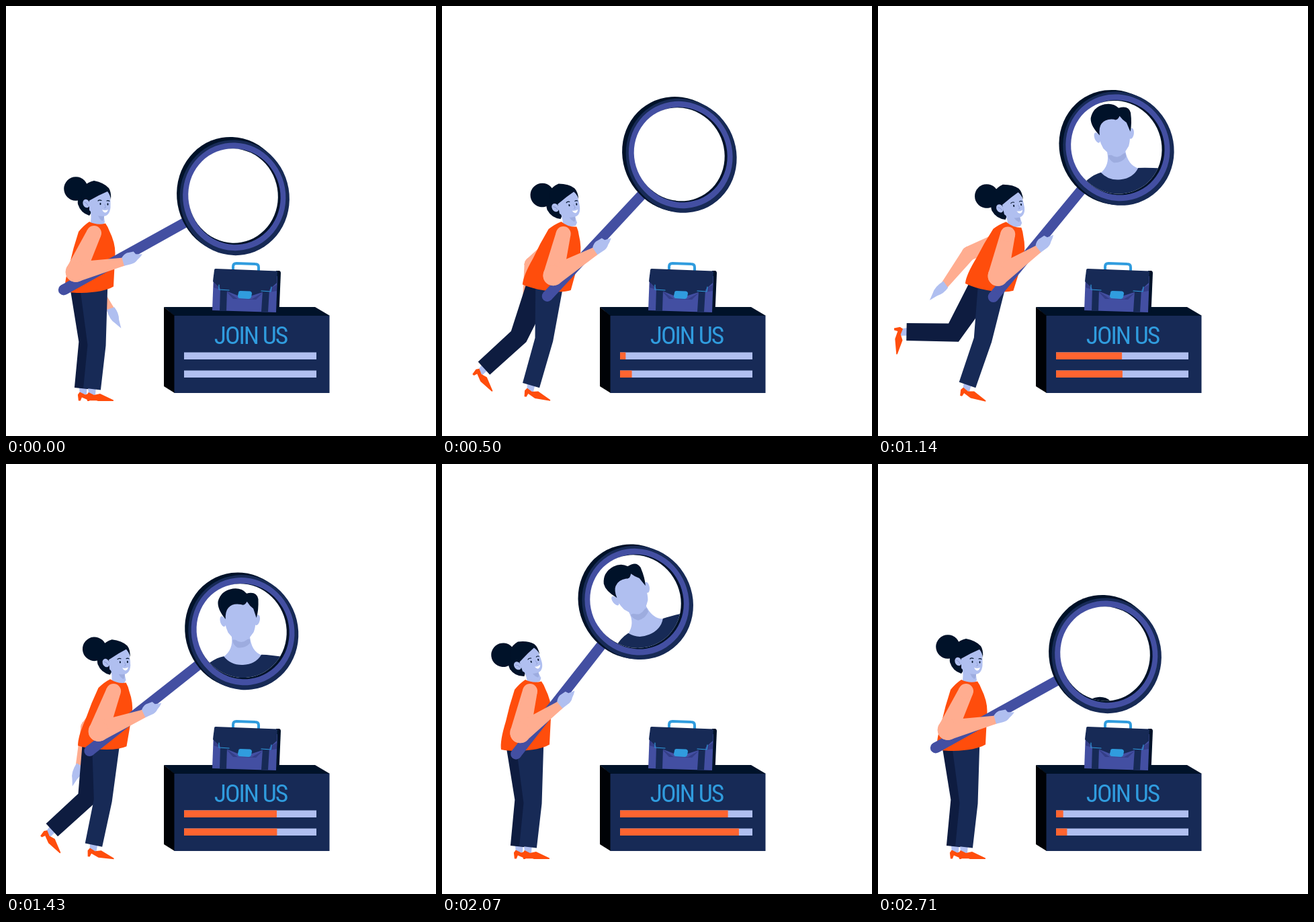
Write an HTML page with a canvas that moves like this. It is 640x640 px and loops after 2780 ms.

```html
<!DOCTYPE html>
<html lang="en">
<head>
<meta charset="utf-8">
<title>Join us</title>
<style>
  html, body { margin: 0; width: 100%; height: 100%; overflow: hidden; background: #fff; }
  canvas { display: block; width: 640px; height: 640px; }
</style>
</head>
<body>
<canvas id="stage" width="640" height="640"></canvas>
<script>
const ctx = document.getElementById('stage').getContext('2d');
const LOOP = 2780, STEP = 1000 / 14, RAD = Math.PI / 180;
const C = {
  navy: '#172a56', dark: '#0e1c40', black: '#001229', blue: '#434fa2', lilac: '#b0bff0',
  shade: '#9dacdf', orange: '#ff4d0c', bar: '#ff6430', pink: '#ffad90', sky: '#309cde'
};

// ---------- motion ----------
const clamp = x => Math.max(0, Math.min(1, x));
const smooth = x => { x = clamp(x); return x * x * (3 - 2 * x); };
const ramp = (t, a, b) => clamp((t - a) / (b - a));

function slope(keys, i) {
  if (!i || i === keys.length - 1) return 0;
  const [p, k, n] = [keys[i - 1], keys[i], keys[i + 1]];
  const a = (k[1] - p[1]) / (k[0] - p[0]), b = (n[1] - k[1]) / (n[0] - k[0]);
  return a * b <= 0 ? 0 : 2 * a * b / (a + b);
}

// Monotone cubic through [time, value] keys.
function sample(keys, t) {
  if (t >= keys[keys.length - 1][0]) return keys[keys.length - 1][1];
  let i = 0;
  while (t >= keys[i + 1][0]) i++;
  const [t0, v0] = keys[i], [t1, v1] = keys[i + 1], d = t1 - t0, u = (t - t0) / d;
  const h = u * u * (3 - 2 * u);
  return v0 + (v1 - v0) * h + d * u * (1 - u) * (slope(keys, i) * (1 - u) - slope(keys, i + 1) * u);
}

const TIMES = [0, 290, 710, 930, 1140, 1710, 2070, 2185, 2640];
// rest, step, reach, peak, settle in the lunge; then lift and top of the second move.
const track = (rest, step, reach, peak, settle, lift = rest, top = rest) =>
  [rest, step, reach, peak, settle, rest, lift, top, rest].map((v, i) => [TIMES[i], v]);

const tracks = {
  hipX: track(124, 143.5, 163.5, 167, 165),
  hipY: track(424, 422.3, 421, 421.5, 421),
  lean: track(0, 9, 14.5, 15, 14.5),
  tilt: track(0, -4, -16, -16, -12, -18, -22),
  upper: track(25.2, 18, 11, 10.5, 13.2, 13.3, 8.5),
  lens: track(29, 39.6, 52, 53.2, 50.6, 51.8, 60.5),
  thigh: track(-4.7, 9.8, 34, 42, 32),
  shin: track(5.8, 26, 68, 80, 91),
  kneeX: track(135, 146, 156, 158, 156),
  kneeY: track(505, 496, 497, 497, 497),
  ankleX: track(128, 131.5, 133, 133, 133),
  ankleY: track(570, 566, 564, 564, 564),
  backUpper: track(10, 30, 63, 66, 67),
  backFore: track(-12, -5, 22, 32, 37.5)
};

// ---------- drawing helpers ----------
function fill(color, d) {
  ctx.fillStyle = color;
  ctx.fill(new Path2D(d));
}
function line(color, width, d) {
  ctx.strokeStyle = color;
  ctx.lineWidth = width;
  ctx.lineCap = ctx.lineJoin = 'round';
  ctx.stroke(new Path2D(d));
}
function oval(color, x, y, rx, ry = rx, turn = 0) {
  ctx.fillStyle = color;
  ctx.beginPath();
  ctx.ellipse(x, y, rx, ry, turn, 0, 7);
  ctx.fill();
}
function rect(color, x, y, w, h) {
  ctx.fillStyle = color;
  ctx.fillRect(x, y, w, h);
}
function placed(x, y, deg, draw) {
  ctx.save();
  ctx.translate(x, y);
  ctx.rotate(deg * RAD);
  draw();
  ctx.restore();
}
function turn(x, y, deg) {
  const c = Math.cos(deg * RAD), s = Math.sin(deg * RAD);
  return [x * c - y * s, x * s + y * c];
}
const add = (a, b) => [a[0] + b[0], a[1] + b[1]];
const swing = (from, length, deg) => add(from, turn(0, length, deg));

function poly(color, points) {
  fill(color, 'M' + points.map(p => p.join(' ')).join('L') + 'Z');
}
function capsule(color, a, ra, b, rb) {
  const angle = Math.atan2(b[1] - a[1], b[0] - a[0]) / RAD;
  const na = turn(0, ra, angle), nb = turn(0, rb, angle);
  poly(color, [add(a, na), add(b, nb), [b[0] - nb[0], b[1] - nb[1]], [a[0] - na[0], a[1] - na[1]]]);
  oval(color, ...a, ra);
  oval(color, ...b, rb);
}
function leg(color, hip, knee, ankle, hipWidth) {
  const a1 = Math.atan2(knee[1] - hip[1], knee[0] - hip[0]) / RAD;
  const a2 = Math.atan2(ankle[1] - knee[1], ankle[0] - knee[0]) / RAD;
  const half = (a2 - a1) / 2;
  // The thigh starts a little inside the shirt.
  const edges = [
    [add(hip, turn(-12, 0, a1)), turn(0, hipWidth, a1)],
    [knee, turn(0, 13.5 / Math.cos(half * RAD), a1 + half)],
    [ankle, turn(0, 13, a2)]
  ];
  const side = s => edges.map(([p, n]) => [p[0] + s * n[0], p[1] + s * n[1]]);
  placed(...ankle, a2 - 96, () => {
    fill(C.lilac, 'M-6 -4L6 -4L5 9L-5 9Z');
    fill(C.orange, 'M-5 5L-8 9L-7 18H-4L-2 13L9 18H32V16.5L12 7L3 9Z');
  });
  poly(color, [...side(1), ...side(-1).reverse()]);
}

// ---------- scenery ----------
const FONT = '"Noto Sans ExtraCondensed", "Roboto Condensed", "Open Sans Condensed", "Open Sans", sans-serif';
const setFont = size => { ctx.font = `400 extra-condensed ${size}px ${FONT}`; };

function box(t) {
  fill(C.black, 'M235 448H460L482 461H250Z');
  fill('#000206', 'M235 448L251 461V576L235 566Z');
  rect(C.navy, 250.5, 461, 231, 115);

  ctx.letterSpacing = '-2px';
  setFont(42);
  const width = ctx.measureText('JOIN US').width;
  setFont(42 * Math.min(1, 110 / width));
  ctx.textAlign = 'center';
  ctx.fillStyle = C.sky;
  ctx.fillText('JOIN US', 364, 503);

  const first = 0.9 * (ramp(t, 440, 1710) - ramp(t, 2000, 2760));
  const second = 0.26 * ramp(t, 390, 710) + 0.24 * ramp(t, 710, 1140)
    + 0.4 * ramp(t, 1140, 1710) - 0.9 * ramp(t, 2070, 2780);
  [[515.5, first], [542.5, second]].forEach(([y, part]) => {
    rect(C.lilac, 265, y, 197, 10.5);
    rect(C.bar, 265, y, 197 * part, 10.5);
  });
}

function briefcase() {
  line(C.sky, 4, 'M338 392V388Q338 383 343 383L371 384Q376 384 376 389V394');
  fill(C.black, 'M402 394L407 394Q409 395 409 397L406.500 456L400 455Z');
  fill(C.blue, 'M309 400L404 402L402 456L307 453Z');
  fill('#343e88', 'M309 411L345 436H366L403 415V424L381 428L372 437L338 436L328 425L309 419Z');
  fill(C.navy, 'M319 420L329 422L328 454L318 453.500Z M382 424L392 422L390 455.500L380 455Z');
  fill(C.navy, 'M310 393Q310 391 312 391L404 394.500L403 412L391 423L366 431H345L320 421L308 410Z');
  line(C.sky, 1.2, 'M317 415V422L332 423 M380 424L394 425L395 418');
  fill(C.sky, 'M349 424L363 424.500Q366 425 366 428L365 433Q364 436 361 436L348 435Q345 435 345 431L346 427Q346 424 349 424Z');
}

// ---------- magnifier ----------
function candidate() {
  fill(C.lilac, 'M323 292Q325 312 309 322Q322 345 340 344Q358 342 367 322Q351 316 350 292Z');
  fill(C.shade, 'M324 297H350V303Q342 311 331 309Q324 304 324 297Z');
  fill(C.navy, 'M270 400V346Q290 324 310 321Q320 335 338 335Q357 335 366 321Q382 322 410 328V400Z');
  oval(C.lilac, 311, 269, 4, 8, -0.25);
  oval(C.lilac, 362, 269, 4, 8, 0.25);
  fill(C.lilac, 'M313 250Q320 238 337 238Q356 238 361 250Q361 276 356 287Q346 301 337 301Q328 300 318 286Q312 272 313 250Z');
  fill(C.black, 'M315 266Q303 250 305 239Q310 223 328 221Q341 220 348 229Q363 226 365 238Q365 255 361 266L357 252Q352 248 348 241Q344 248 339 245Q327 242 320 249Q315 254 315 266Z');
}

function lensRing(t, center, angle, lean) {
  const tilt = -0.17, rise = smooth(ramp(t, 380, 1060)), sink = smooth(ramp(t, 2210, 2820));
  const drop = 140 - 145 * rise + 5 * ramp(t, 1140, 1710) + 136 * sink;
  placed(...center, 29 - angle, () => {
    ctx.translate(-338, -282);
    oval(C.black, 336, 281, 81.500, 87, tilt);
    oval(C.navy, 340.5, 284.5, 81.500, 86, tilt);
    oval(C.blue, 340, 283, 76.500, 80.5, tilt);
    oval(C.black, 340.5, 283, 68.3, 71.5, tilt);
    oval('#fff', 338.3, 281.7, 66.7, 70.3, tilt);
    ctx.clip();
    // The portrait turns with the lens, less the lean of the body, and slides vertically.
    ctx.translate(338, 282);
    ctx.rotate((angle - 29) * RAD);
    ctx.translate(0, drop);
    ctx.rotate((29 - angle + lean) * RAD);
    ctx.translate(-338, -282);
    candidate();
  });
}

// ---------- recruiter ----------
function head() {
  fill(C.black, 'M119 268Q105 282 107 295Q111 308 124 312L132 300V270Z');
  fill(C.lilac, 'M125 300Q128 315 125 326H144L147 322L145 308Z');
  fill(C.shade, 'M137 312L146 312Q146 319 143 320Q139 317 137 312Z');
  fill(C.lilac, 'M124 285L140 270L153 274Q156 284 155.500 300Q154 313 144 313Q132 313 124 304Z');
  oval(C.black, 104, 272, 17.8);
  fill(C.black, 'M116 268Q122 262 131 260Q146 263 153 271Q157 277 156 288Q155 281 151 276Q139 281 127 288L121 291L113 292Q112 277 116 268Z');
  oval(C.lilac, 119.5, 294, 5, 6.5, -0.35);
  line('#7f8fc9', 0.8, 'M117 292Q121 293 122 297');
  line(C.black, 1.1, 'M137 290Q139 288 142 289.500 M150 290Q152 289 154 290.500');
  oval(C.black, 140.5, 294.5, 1, 1.7);
  oval(C.black, 151.5, 295, 1, 1.7);
  line('#8c9bd3', 0.8, 'M147 295L148.500 300L146.500 300.500');
  fill('#fff', 'M143 303Q147 305 152 303Q150 308 147 307.500Q144 306 143 303Z');
}

function torso() {
  fill(C.orange, 'M124 321Q136 327 148 323.500Q152 329 154 335Q162.500 352 162.500 368L160 417.500Q146 426 112 427Q98 427 88 425Q86 412 95 383Q100 360 108 336Q115 327 124 321Z');
}

function hand() {
  fill(C.lilac, 'M99 0Q104 -3 109 -2.500L118.500 0.500L119.500 5.500L128 10.500Q123 13 118 14Q112 17 106 15L96 12.500Z');
}

function recruiter(t) {
  const p = {};
  for (const name in tracks) p[name] = sample(tracks[name], t);
  p.backFore -= 24 * (1 - smooth(t / 290));

  const hip = [p.hipX, p.hipY];
  const onBody = (x, y) => add(hip, turn(x - 124, y - 424, p.lean));

  const backElbow = swing(onBody(132, 342), 63, p.backUpper);
  const backWrist = swing(backElbow, 61, p.backFore);
  capsule(C.pink, onBody(132, 342), 12, backElbow, 10.5);
  capsule(C.pink, backElbow, 10.5, backWrist, 5.5);
  placed(...backWrist, p.backFore + 13, () =>
    fill(C.lilac, 'M-6 -4L6 -3Q9 8 5 17L3 30L-2 20Q-8 12 -6 -4Z'));

  const backHip = add(hip, [-8 - 0.45 * p.lean, 4]);
  const backKnee = swing(backHip, 72, p.thigh);
  leg(C.dark, backHip, backKnee, swing(backKnee, 70, p.shin), 20);
  leg(C.navy, add(hip, [7 - 0.25 * p.lean, 1]), [p.kneeX, p.kneeY], [p.ankleX, p.ankleY], 21);

  placed(...onBody(136, 319), p.tilt, () => {
    ctx.translate(-136, -319);
    head();
  });
  placed(...hip, p.lean, () => {
    ctx.translate(-124, -424);
    torso();
  });

  // Forearm, hand and magnifier turn as one piece around the elbow.
  const shoulder = onBody(131, 338);
  const elbow = swing(shoulder, 64, p.upper);
  const onHandle = (u, v) => add(elbow, turn(u - 28.5, v + 14.5, -p.lens));
  capsule(C.blue, onHandle(0, 0), 8, onHandle(212, 0), 7.5);
  lensRing(t, onHandle(288, 0), p.lens, p.lean);
  capsule(C.pink, shoulder, 11, elbow, 15);
  capsule(C.pink, elbow, 15, onHandle(97, 6.3), 6.3);
  placed(...onHandle(0, 0), -p.lens, hand);
}

function draw(now) {
  const clock = Math.floor((now % LOOP) / 10) * 10;
  const t = Math.floor((clock + 5) / STEP) * STEP;
  rect('#fff', 0, 0, 640, 640);
  box(t);
  briefcase();
  recruiter(t);
}

const start = performance.now();
function tick() {
  draw(performance.now() - start);
  requestAnimationFrame(tick);
}
tick();
</script>
</body>
</html>
```
